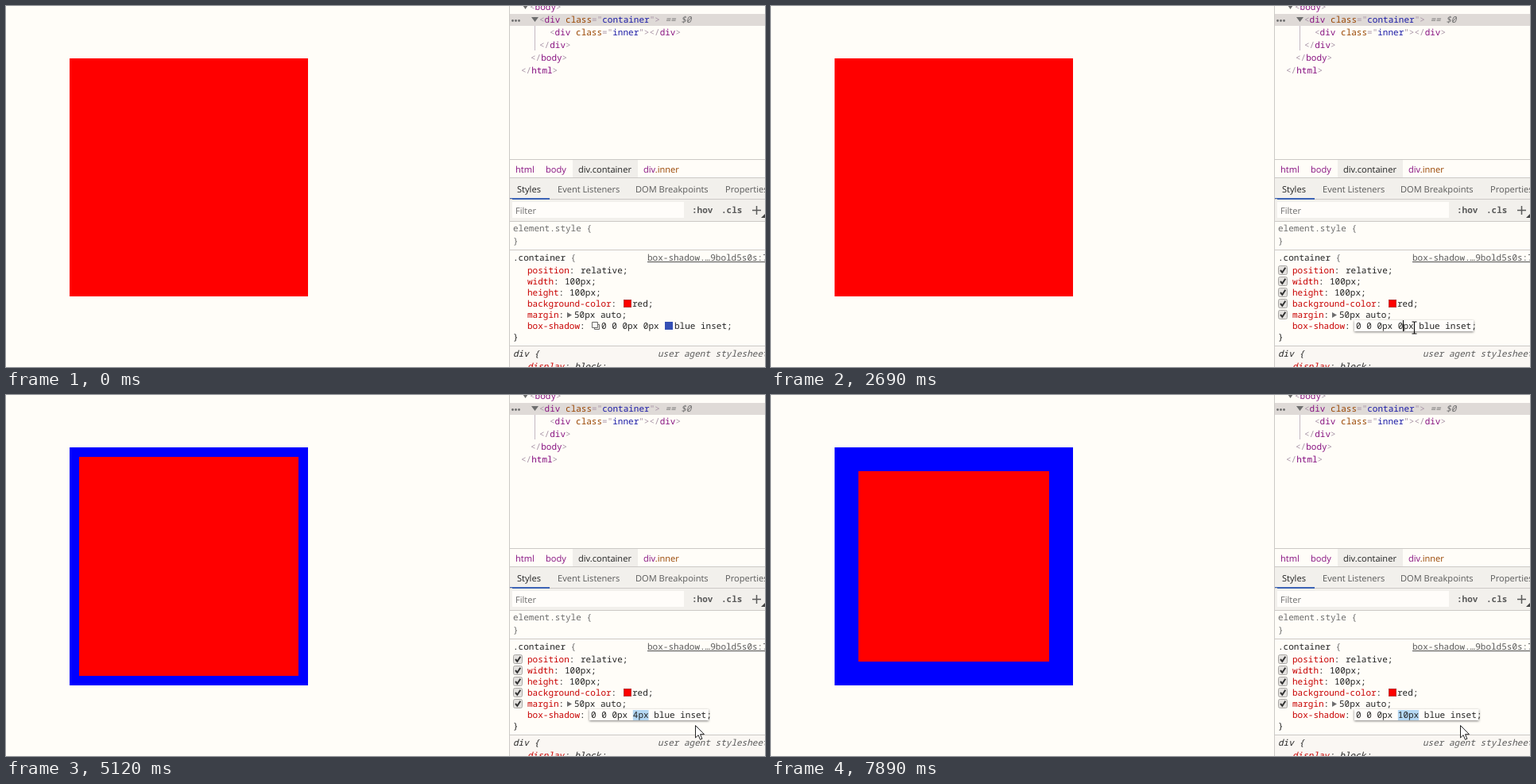
Recreate the animation shown at these times as an HTML page. Size 955 by 455 pixels, loop 8 s.

```html
<!DOCTYPE html>
<html lang="en">
<head>
<meta charset="utf-8">
<title>Inset shadow spread</title>
<style>
  html, body { margin: 0; width: 100%; height: 100%; overflow: hidden; background: #fffdf8; }
  svg { display: block; }
  text { white-space: pre; text-rendering: geometricPrecision; fill: #222; }
  .m { font: 11px "Noto Sans Mono", monospace; }
  .u { font: 11.1px "Open Sans", sans-serif; }
  .i { font-style: italic; }
  .bold { font-weight: bold; }
  .tag { fill: #881280; }
  .punct { fill: #a894a6; }
  .attr { fill: #994500; }
  .val { fill: #1a1aa6; }
  .prop { fill: #c80000; }
  .grey { fill: #6c6c6c; }
  .ui { fill: #5a5a5a; }
  #field { filter: drop-shadow(0 1px 1.5px rgba(0, 0, 0, .5)); }
</style>
</head>
<body>
<svg id="stage" width="955" height="455" viewBox="0 0 955 455">
  <rect width="955" height="455" fill="#fffdf8"/>
  <rect x="80" y="66" width="300" height="300" fill="#00f"/>
  <rect id="core" fill="#f00"/>

  <g id="panel" shape-rendering="crispEdges">
    <rect x="634" y="10" width="321" height="15" fill="#dfdad7"/>
    <rect x="713" y="194" width="82" height="22" fill="#f0eeea"/>
    <rect x="634" y="217" width="321" height="54" fill="#f2f0ec"/>
    <rect x="634" y="242" width="50" height="2" fill="#3b62b5"/>
    <rect x="637" y="247" width="216" height="20" fill="#fffdfa"/>
    <rect x="634" y="429" width="321" height="26" fill="#faf7f3"/>
    <path d="M633.5 0V455M634 193.5H955M634 216.5H955M634 243.5H637M684 243.5H955M634 271.5H955M634 307.5H955M634 428.5H955" stroke="#ccc9c6" fill="none"/>
    <path d="M665.5 25V56" stroke="#c4b8c3"/>
  </g>
  <g fill="#6e6e6e">
    <path d="M661 14h9l-4.500 6zM650 -1h7l-3.500 5z"/>
    <path d="M706 386v7l6-3.500z"/>
    <path d="M955 262v5h-5z" fill="#444"/>
    <g id="more"></g>
  </g>
  <path d="M939 257.500h11M944.500 252v11" stroke="#5a5a5a" stroke-width="1.500"/>
  <rect x="777.500" y="370.500" width="9" height="9" fill="#f00" stroke="#b33"/>

  <g id="labels"></g>
  <g id="checks"></g>

  <g id="idle">
    <g fill="#fffdf8" stroke="#666">
      <path d="M740.500 401.500h6v6h-6z"/>
      <path d="M737.500 398.500h7v7h-7z"/>
    </g>
    <rect x="829" y="398" width="10" height="10" fill="#3550b5"/>
  </g>
  <g id="menu" fill="#5f5f5f">
    <circle cx="945.500" cy="411" r="1.600"/>
    <circle cx="945.500" cy="416" r="1.600"/>
    <circle cx="945.500" cy="421" r="1.600"/>
  </g>

  <g id="edit">
    <rect id="field" x="734" y="396" height="14" fill="#fffdfa"/>
    <rect id="mark" y="397" height="13" fill="#b4d7f3"/>
    <text id="value" class="m" x="736" y="407"></text>
    <text id="semi" class="m" y="407">;</text>
    <rect id="caret" x="795" y="396" width="1" height="14" fill="#000"/>
  </g>

  <path id="arrow" d="M.5 .5V16l3.600-3.400L6.500 18.300l2.400-1L6.500 11.700H11.500z" fill="#fff" stroke="#222"/>
  <path id="beam" d="M-3 -7.500H-1Q0 -7.500 0 -6.500Q0 -7.500 1 -7.500H3M0 -6.500V6.500M-3 7.500H-1Q0 7.500 0 6.500Q0 7.500 1 7.500H3" transform="translate(0 0)" fill="none" stroke="#111" stroke-width="1.200"/>
</svg>
<script>
const LOOP = 8000, CHAR = 6.6, PITCH = 14;
const $ = id => document.getElementById(id);
const show = (id, on) => $(id).style.display = on ? "" : "none";
const setAttrs = (id, attrs) => {
  for (const name in attrs) $(id).setAttribute(name, attrs[name]);
};
const esc = s => s.replace(/</g, "&lt;").replace(/>/g, "&gt;");
const span = (cls, s) => `<tspan class="${cls}">${esc(s)}</tspan>`;
const put = (x, y, html, cls = "m", group = "labels") =>
  $(group).insertAdjacentHTML("beforeend", `<text x="${x}" y="${y}" class="${cls}">${html}</text>`);

const open = (name, cls) => span("punct", "<") + span("tag", name) +
  (cls ? " " + span("attr", "class") + span("punct", '="') + span("val", cls) + span("punct", '"') : "") +
  span("punct", ">");
const close = name => span("punct", "</") + span("tag", name) + span("punct", ">");

// element tree
put(659, 5, open("body"));
put(671, 21, open("div", "container") + span("i grey", " == $0"));
put(684, 37, open("div", "inner") + close("div"));
put(671, 53, close("div"));
put(660, 69, close("body"));
put(648, 85, close("html"));
$("more").innerHTML = [637.5, 641.5, 645.5].map(x => `<circle cx="${x}" cy="18.5" r="1.4"/>`).join("");

// breadcrumbs and tabs
put(641, 210, "html", "u tag");
put(679, 210, "body", "u tag");
put(720, 210, "div.container", "u");
put(802, 210, span("tag", "div") + span("attr", ".inner"), "u");
put(643, 235, "Styles", "u");
put(694, 235, "Event Listeners", "u ui");
put(792, 235, "DOM Breakpoints", "u ui");
put(905, 235, "Properties", "u ui");
put(641, 262, "Filter", "u grey");
put(863, 261, ":hov", "m bold ui");
put(900, 261, ".cls", "m bold ui");

// style rules
put(638, 284, "element.style {", "m grey");
put(638, 300, "}", "m grey");
put(638, 321, ".container" + span("grey", " {"));
put(807, 321, '<tspan text-decoration="underline">box-shadow.…9bold5s0s:7</tspan>', "m ui");
const rows = [
  ["position", [[723, "relative;"]]],
  ["width", [[703, "100px;"]]],
  ["height", [[709, "100px;"]]],
  ["background-color", [[788, "red;"]]],
  ["margin", [[715, "50px auto;"]]],
  ["box-shadow", []]
];
rows.forEach(([name, values], i) => {
  const y = 337 + i * PITCH;
  put(656, y, span("prop", name) + ":");
  values.forEach(([x, s]) => put(x, y, s));
  $("checks").insertAdjacentHTML("beforeend",
    `<g transform="translate(638 ${y - 10})"><rect x=".5" y=".5" width="11" height="11" rx="2" fill="#e4e2df" stroke="#a9a7a4"/>
     <path d="M3 6l2.300 2.800L9.300 2.800" fill="none" stroke="#333" stroke-width="2"/></g>`);
});
$("checks").lastElementChild.id = "lastCheck";
put(749, 407, "0 0 0px 0px", "m", "idle");
put(841, 407, "blue inset;", "m", "idle");
put(638, 421, "}");
put(638, 442, "div {", "m i");
put(820, 442, "user agent stylesheet", "m i ui");
put(656, 458, span("prop", "display") + ": block;", "m i");

// time, x, y, pointer shape
const path = [
  [210, 812, 448, "arrow"], [365, 798, 420, "arrow"], [440, 792, 412, "beam"],
  [670, 787, 410, "beam"], [830, 787, 410, "beam"], [1160, 797, 398, "beam"],
  [1490, 810, 403, "beam"], [1870, 810, 403, "beam"], [2250, 797, 405, "beam"],
  [2550, 797, 405, "beam"], [2630, 809, 405, "beam"], [2770, 836, 409, "beam"],
  [2850, 856, 414, "arrow"], [2930, 867, 416, "arrow"], [LOOP, 867, 416, "arrow"]
];
const bumps = [3710, 4240, 4720, 5120, 5500, 5800, 6270, 6660, 7040, 7890];
const HOVER = 365, EDIT = 2250, CLICK = 2550, CARET_OFF = 3080, CARET_ON = 3640;

function drawPointer(t) {
  const k = path.findIndex(p => p[0] > t) - 1;
  show("arrow", k >= 0 && path[k][3] === "arrow");
  show("beam", k >= 0 && path[k][3] === "beam");
  if (k < 0) return;
  const [t0, x0, y0, shape] = path[k], [t1, x1, y1] = path[k + 1];
  const steps = Math.max(1, Math.round((t1 - t0) / 75));
  const f = Math.floor((t - t0) / (t1 - t0) * steps) / steps;
  const x = Math.round(x0 + (x1 - x0) * f), y = Math.round(y0 + (y1 - y0) * f);
  const half = shape === "beam" ? 0.5 : 0;
  setAttrs(shape, { transform: `translate(${x + half} ${y + half})` });
}

function draw(t) {
  const spread = bumps.filter(b => b <= t).length;
  const editing = t >= EDIT;
  const inset = spread * 3, side = 300 - 2 * inset;
  setAttrs("core", { x: 80 + inset, y: 66 + inset, width: side, height: side });

  show("checks", t >= HOVER);
  show("lastCheck", !editing);
  show("menu", t >= HOVER && !editing);
  show("idle", !editing);
  show("edit", editing);

  const value = `0 0 0px ${spread}px blue inset`;
  const width = value.length * CHAR;
  $("value").textContent = value;
  setAttrs("field", { width: width + 4.8 });
  setAttrs("semi", { x: 736 + width });
  show("mark", t < CLICK || spread > 0);
  setAttrs("mark", spread
    ? { x: 736 + 8 * CHAR, width: `${spread}px`.length * CHAR }
    : { x: 736, width: width + 0.8 });
  show("caret", !spread && (t >= CLICK && t < CARET_OFF || t >= CARET_ON));
  drawPointer(t);
}

const start = performance.now();
function tick() {
  draw((performance.now() - start) % LOOP);
  requestAnimationFrame(tick);
}
tick();
</script>
</body>
</html>
```
